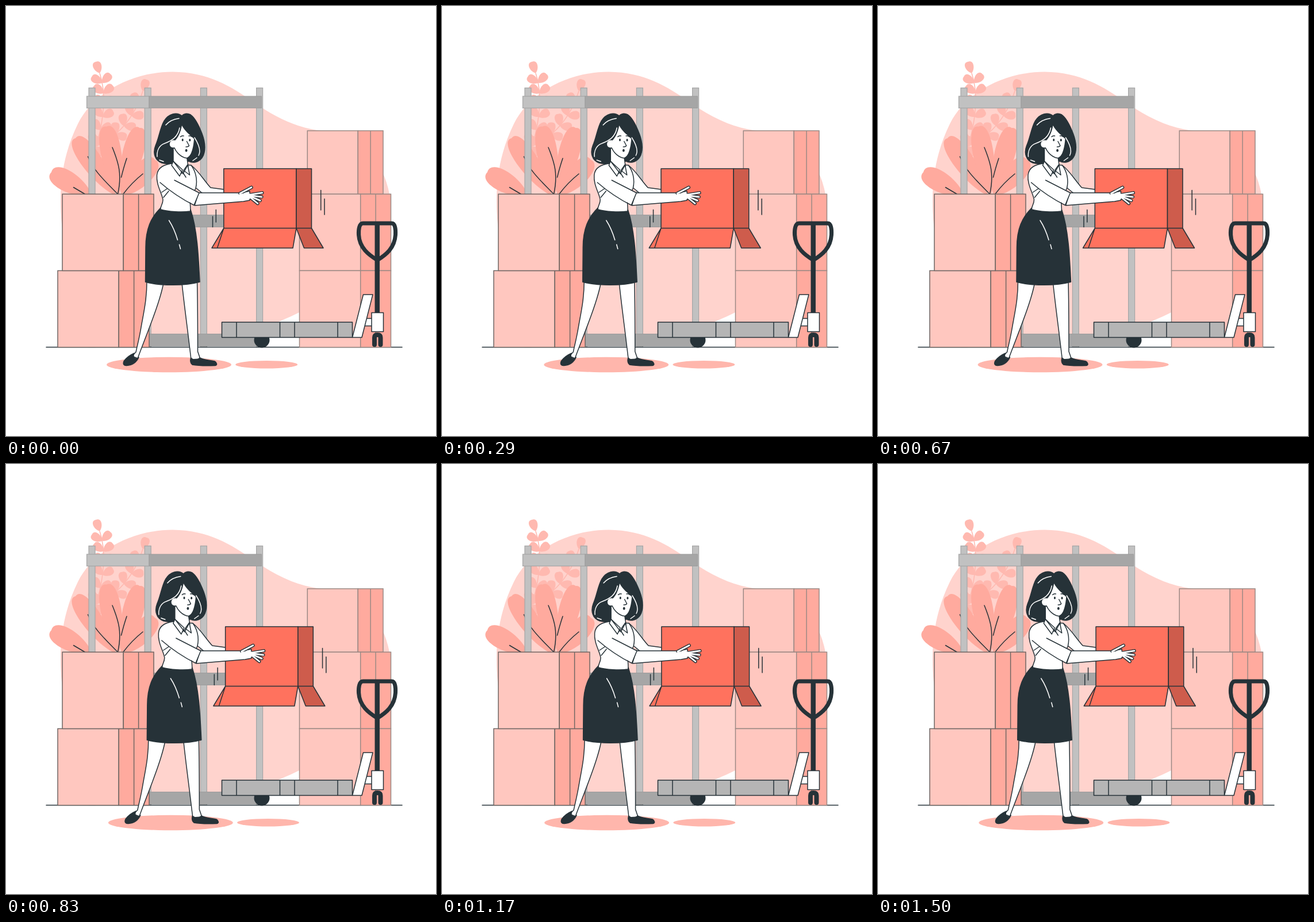
Animation of 748 by 748 pixels, one loop 1.54 s. Source, as an HTML page:

```html
<!DOCTYPE html>
<html lang="en">
<head>
<meta charset="utf-8">
<title>Carrying a box</title>
<style>
html, body { margin: 0; width: 100%; height: 100%; overflow: hidden; background: #fff; }
svg { display: block; width: 100%; height: 100%; }
.ink { stroke: #263238; stroke-width: 1.5; stroke-linecap: round; stroke-linejoin: round; }
.line { fill: none; }
.dark { fill: #263238; }
.white { fill: #fff; }
.pale { fill: #ffc7bf; }
.mid { fill: #ffaa9e; }
.hot { fill: #ff725e; }
.shade { fill: #ce5c4c; }
.post { fill: #c1c1c1; stroke: #a6a6a6; stroke-width: 1.2; }
.beam { fill: #a6a6a6; stroke: #9c9c9c; stroke-width: 1; }
.shine { fill: none; stroke: #fff; stroke-width: 1.5; stroke-linecap: round; }
</style>
</head>
<body>
<svg viewBox="0 0 748 748">
  <path fill="#ffd3cd" d="M97 380C91 320 97 262 125 205C151 153 215 115 290 114.500C352 115 392 140 432 168C470 195 510 214 556 218C620 226 656 270 667 327C678 400 610 490 510 533C470 553 420 572 340 582C210 592 110 500 97 380Z"/>
  <g id="sprigs" fill="#ffb9b0" stroke="#ffb9b0"></g>
  <g id="fan" class="mid"></g>
  <path class="ink line" d="M117.500 315.500L137 327M142.500 262C152 287 176 308 194 327M185 246C196 273 202 293 194.500 327M210 265Q204 283 200.500 298M238 292Q219 307 204 327"/>
  <g id="rack"></g>
  <path class="ink" d="M70 593.500H689"/>
  <g id="crates"></g>

  <!-- pallet truck -->
  <circle class="dark" cx="445" cy="581" r="13.500"/>
  <g class="ink">
    <path class="white" d="M624 543.500H637V556.500H624Z"/>
    <path fill="#b5b5b5" d="M375.500 550H602.500V576.500H375.500ZM401 550V576.500M476.500 550V576.500M502 550V576.500M577 550V576.500"/>
    <path class="white" d="M602.500 576.500L621.500 502H638L619 576.500Z"/>
  </g>
  <path fill="none" stroke="#263238" stroke-width="7" stroke-linejoin="round" d="M621 378H671C677 378 678 389 677.500 398C676 421 661 433 646 442C631 433 615 421 613.500 398C613 389 614.500 378 621 378Z"/>
  <path class="dark" d="M641.500 378H650V536H641.500Z"/>
  <path class="ink white" d="M636 533.500H656.500V566.500H636Z"/>
  <path fill="none" stroke="#263238" stroke-width="8" stroke-linecap="round" d="M641 589V577Q641 572 646 572Q651.500 572 651.500 577V589"/>

  <g id="mover">
    <g fill="#ffb6ac">
      <ellipse cx="283.500" cy="624" rx="108.500" ry="13.200"/>
      <ellipse cx="453.200" cy="623.800" rx="54" ry="6.700"/>
    </g>
    <path class="ink" d="M365.300 354.500V376M359.500 366V384.500M547.700 320.500V355M554 335.500V363"/>

    <!-- far arm -->
    <path class="ink white" d="M322 277C336 288 344 303 356 316L382 319.500V326H342L325 312Z"/>

    <!-- carried box -->
    <g class="ink">
      <path class="hot" d="M378.800 283H505V386.500H378.800ZM378.800 386.500H505L499 421H358ZM378.800 386.500L367.500 421"/>
      <path class="shade" d="M505 283H531.500V386.500H505ZM505 386.500H531.500L552 421H518.500Z"/>
    </g>

    <!-- legs and shoes -->
    <g class="ink">
      <path class="white" d="M245 478C245 512 239 535 235 559C232 577 229 588 226 602L219 609L229 613C246 567 267 518 274 482Z"/>
      <path class="white" d="M306 482C310 520 315 556 319 590L322 615L338 614L333.500 601C333.500 560 333.500 520 332.500 478Z"/>
      <path class="dark" d="M223 604C216 607 209 612 205 618C203 623 205 626 210 625.500C219 625 227 620 231 611C227 615 219 614 223 604Z"/>
      <path class="dark" d="M321.500 612C320 617 321 622 324 624C335 626 352 626 364 625.500C368 625 367 620 363 618C354 616 345 616 337 612C334 616 326 617 321.500 612Z"/>
    </g>

    <!-- skirt and shirt -->
    <path class="ink dark" d="M269 351C252 368 243 388 243 420L242.500 480C266 487 313 487 337 480C335 439 333 389 321 354Z"/>
    <path class="shine" d="M283.500 373C290 383 295 395 298.500 407M301.500 415L303.500 422.500"/>
    <path class="ink white" d="M288 274C276 276 264 280 262.500 294C261 311 271 325 273 337C273 345 268 349 269 354C282 358 307 359 320.500 357C322 350 319 344 321 337L330 317C334 301 329 286 322 277Z"/>

    <!-- near arm -->
    <path class="ink white" d="M335 325H408L424 322V338L413 340L328 347Z"/>
    <g id="hand" stroke-linecap="round"></g>
    <path class="white" d="M268 307L327 346L336 325L293 302L275 292Z"/>
    <path class="ink line" d="M268 307C283 320 304 335 327 346.500L336 325L293 303M280 318L271 324M283 322L274 333"/>

    <!-- head -->
    <path class="ink dark" d="M306 191C297 184 283 187 275 200C268 212 266 230 260 243C255 256 259 269 271 273C278 275 286 275 292 271L318 270C325 274 335 272 341 264C348 254 347 238 341 222C336 209 330 195 321 189C315 186 309 187 306 191Z"/>
    <path class="ink white" d="M291 246V271L304 292L317 279L314.500 263L300 252Z"/>
    <path class="white" d="M306 208C304 219 299 230 294 234C288 232 284 237 285 242C286 246 290 247 293 246C296 254 305 264 314 264C322 262 326 247 327 231C320 224 311 218 306 208Z"/>
    <path class="ink line" d="M293 247C297 256 306 264 314 264.500"/>
    <path class="shine" d="M301 195.500C290 197 283 201 278 207M302 212C299 228 289 234 276 239C267 242 262 251 263 262M267 268L274 270.500M328 229C335 240 340 251 335 260M332 264L325 269"/>
    <path class="ink line" stroke-width="1.200" d="M303.500 227.500Q306 225 309 226M318 226Q321 225 323.500 227.500M314.500 235.500L318.500 243Q317 245.500 313 245"/>
    <g class="dark">
      <ellipse cx="307.200" cy="233" rx="1.500" ry="2.300"/>
      <ellipse cx="319.800" cy="233.300" rx="1.500" ry="2.300"/>
      <ellipse cx="313.600" cy="251.300" rx="1.900" ry="2.500"/>
    </g>

    <!-- collar -->
    <path class="ink white" d="M291 270L288 277L302 296L307 285ZM316 276L319.500 294L309 286Z"/>
    <path class="ink line" d="M291 270L308 292L316.500 276M308 290L313 298"/>
  </g>
</svg>
<script>
const $ = id => document.getElementById(id);
const times = (n, f) => Array.from({ length: n }, (_, i) => f(i)).join('');
const rad = a => a * Math.PI / 180;
const box = (cls, x, y, w, h) =>
  `<rect class="${cls}" x="${x}" y="${y}" width="${w}" height="${h}"/>`;

// leaf from its base, at an angle in degrees, with length n and bulge w
const leaf = (x, y, a, n, w) =>
  `<path stroke="none" transform="translate(${x} ${y}) rotate(${a})" d="M0 0C${n * .35} ${-w} ${n * 1.08} ${-w} ${n} 0C${n * 1.08} ${w} ${n * .35} ${w} 0 0Z"/>`;

// stem along a quadratic curve, leaf pairs at even steps, one leaf on the tip
function sprig([x0, y0], [x1, y1], [x2, y2], pairs) {
  const at = (a, b, c, t) => (1 - t) ** 2 * a + 2 * t * (1 - t) * b + t * t * c;
  const slope = (a, b, c, t) => (1 - t) * (b - a) + t * (c - b);
  const stem = `<path fill="none" stroke-width="1.6" d="M${x0} ${y0}Q${x1} ${y1} ${x2} ${y2}"/>`;
  return stem + times(pairs + 1, i => {
    const t = i / pairs, x = at(x0, x1, x2, t), y = at(y0, y1, y2, t);
    const a = Math.atan2(slope(y0, y1, y2, t), slope(x0, x1, x2, t)) * 180 / Math.PI;
    const turns = i === pairs ? [0] : [-48, 54];
    return turns.map(d => leaf(x, y, a + d, 21, 10)).join('');
  });
}
$('sprigs').innerHTML =
  sprig([158, 240], [179, 165], [163, 117], 6) +
  sprig([152, 246], [215, 220], [238, 148], 6);

$('fan').innerHTML = times(5, i =>
  leaf(i ? 186 + 5 * i : 150, 330, -150 + 25 * i, i % 4 ? 122 : 82, 24));

$('rack').innerHTML =
  times(4, i => box('post', 144 + 97.2 * i, 142.5, 11, 451)) +
  box('beam', 249, 363.5, 186, 21) + box('beam', 249, 570.5, 195, 21) +
  box('post', 140.5, 157, 108.5, 20.5) + box('beam', 249, 157, 195.5, 20.5);

// every crate has the same proportions
function crate(x, y, w, ink) {
  const h = w * .838, fold = w * .668, strip = x + w * .834;
  return `<g stroke="${ink}" stroke-width="1.5">` + box('pale', x, y, fold, h) +
    box('mid', x + fold, y, w - fold, h) + `<path d="M${strip} ${y}v${h}"/></g>`;
}
const near = '#6f6663', far = '#9b8984', low = 460.4, high = 327.2;
$('crates').innerHTML =
  crate(90, low, 159, near) + crate(98, high, 159, near) +
  crate(524.3, 217, 131.7, far) +
  crate(510.5, high, 159, far) + crate(510.5, low, 159, far);

// fingers fan out from the palm: dark strokes, then white ones on top
const fingers = 'M407 326L427 315.500' + times(4, i => {
  const a = rad(-9 + 16 * i), n = 26 - i;
  return `M420 329l${n * Math.cos(a)} ${n * Math.sin(a)}`;
});
$('hand').innerHTML =
  `<path stroke="#263238" stroke-width="5.6" d="${fingers}"/>` +
  `<path stroke="#fff" stroke-width="2.8" d="${fingers}"/>` +
  '<path stroke="#fff" stroke-width="11" d="M409 332L421 331"/>';

// mirrored shake: linear between evenly spaced offsets
const LOOP = 1540, SHAKE = 1500, STEP = 1000 / 24, LEAD = 27;
const swing = [0, -1.5, 3, -6, 6, -6];
const offset = i => swing[Math.min(i, 10 - i)];

function shake(ms) {
  const p = Math.min(ms / SHAKE, 1) * 10;
  const i = Math.min(Math.floor(p), 9);
  return offset(i) + (offset(i + 1) - offset(i)) * (p - i);
}

function draw(now) {
  const step = Math.min(Math.floor((now % LOOP + 4) / STEP), 36);
  const ms = Math.round(step * STEP / 10) * 10;
  const x = shake(ms + LEAD) - shake(LEAD);
  $('mover').setAttribute('transform', `translate(${x.toFixed(3)} 0)`);
}

const start = performance.now();
function tick() {
  draw(performance.now() - start);
  requestAnimationFrame(tick);
}
tick();
</script>
</body>
</html>
```
